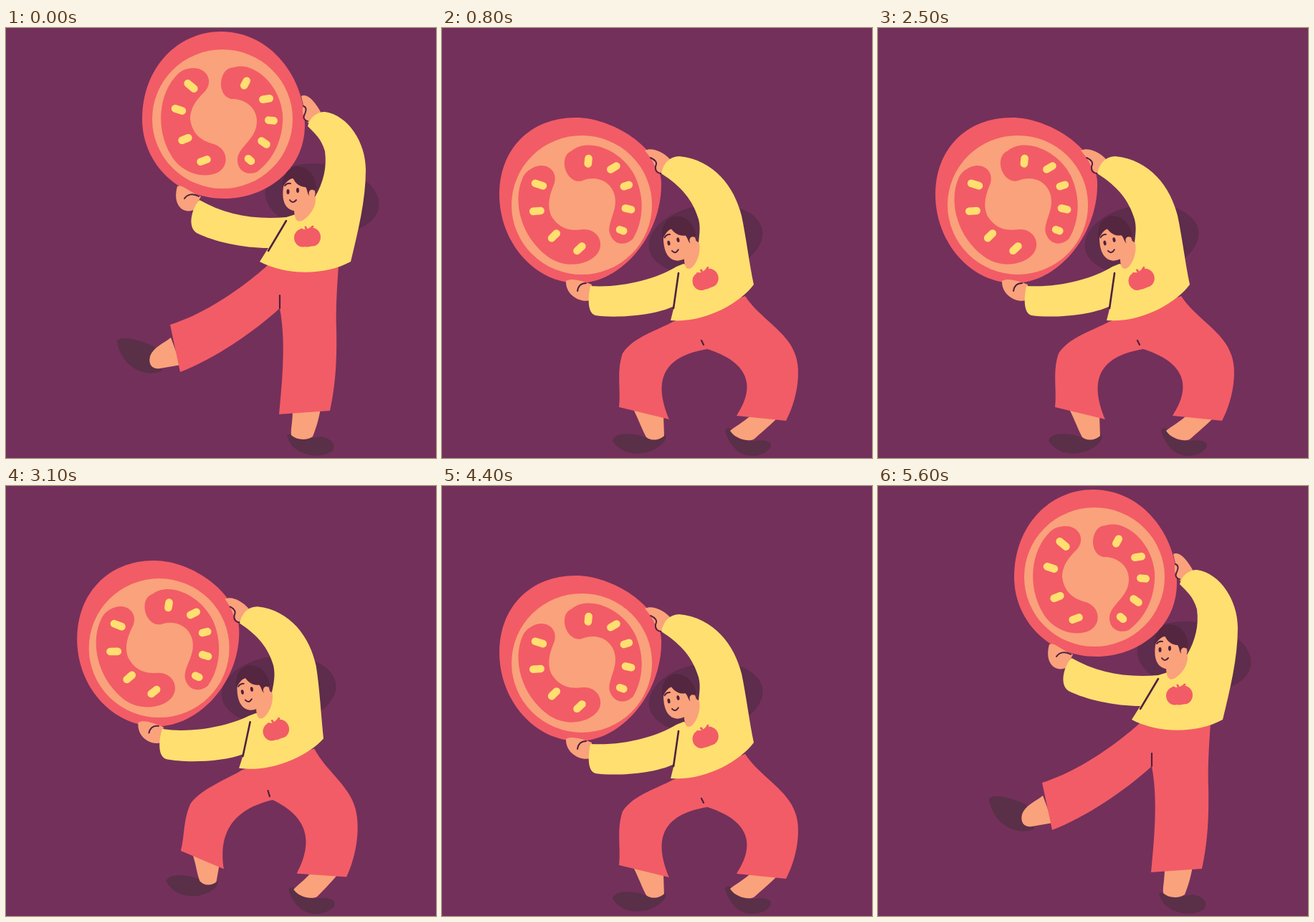
These frames come from a looping animation (600 by 600 pixels, 5.7 s). An HTML page with a canvas:

```html
<!DOCTYPE html>
<html lang="en">
<head>
<meta charset="utf-8">
<title>Tomato dance</title>
<style>
html, body { margin: 0; width: 100%; height: 100%; overflow: hidden; background: #73305b; }
canvas { display: block; width: 100vw; height: 100vh; }
</style>
</head>
<body>
<canvas id="stage" width="600" height="600"></canvas>
<script>
const ctx = document.getElementById('stage').getContext('2d');
const BG = '#73305b', RED = '#f25c66', PEACH = '#faa27b', YELLOW = '#ffdf70';
const HAIR = '#5e2c4c', FRINGE = '#54263f', SHOE = '#5a2f48', INK = '#4d2140';
const STEP = 100, LOOP = 5700, BEAT = 1900, LOW = 800, RISE = 850;

// Each body part has a path for standing tall and one for squatting.
const part = (tall, squat) => ({ tall, squat });

const pants = part(
  'M365 331 C345 350 310 375 285 389 C265 400 248 408 229 414 L243 480 C290 462 345 425 382 391 C389 430 388 470 381 539 L452 534 C459 500 462 470 461 420 C460 390 462 360 464 331 Z',
  'M322 410 C300 422 267 431 252 454 C243 480 250 505 247 529 L317 546 C300 505 296 460 370 448 C415 462 445 490 411 541 L480 548 C495 520 502 480 493 456 C483 424 442 404 423 374 Z');
const shirt = part(
  'M421 137 C424 124 434 117 445 117 C478 122 502 160 502 198 C502 240 491 285 481 326 C440 348 385 343 354 326 L366 307 C330 307 290 298 266 286 C252 277 260 250 270 240 C305 260 345 268 391 264 L404 260 C420 255 428 245 431 236 C443 215 448 195 445 172 C440 155 432 148 421 137 Z',
  'M306 203 C309 188 318 179 331 179 C380 184 408 222 418 262 C424 290 429 330 435 358 C415 385 365 412 319 408 L324 388 C295 402 240 405 214 401 C202 397 204 374 207 360 C250 363 300 350 327 333 L337 329 C350 335 357 318 358 300 C359 288 361 279 358 267 C350 240 334 221 306 203 Z');
const neck = part(
  'M402 252 C402 270 408 273 416 267 C426 260 433 248 432 236 L425 228 Z',
  'M338 318 C337 335 343 340 350 333 C357 325 361 312 359 300 L350 294 Z');
const armLine = part('M391 269 L366 311', 'M330 342 L323 391');
const crotch = part('M382 373 L382 391', 'M362 436 Q365 442 371 447');

const kickShoe = part(
  'M155 437 C160 428 190 436 207 445 L218 478 C200 488 162 478 155 437 Z',
  'M238 576 C240 564 265 564 284 571 L312 567 C318 585 262 612 238 576 Z');
const kickFoot = part(
  'M230 432 C220 440 205 446 201 458 C198 470 205 477 215 475 L244 470 Z',
  'M267 532 C275 548 279 560 285 571 C293 577 304 575 310 569 L309 541 Z');
const baseShoe = part(
  'M392 569 C395 566 400 566 402 570 C415 575 430 572 440 570 C455 574 460 580 456 589 C445 602 400 600 392 569 Z',
  'M395 562 C398 556 403 558 405 563 C415 575 425 577 435 576 C450 574 462 576 458 586 C445 602 408 606 395 562 Z');
const baseFoot = part(
  'M400 533 C400 550 397 560 398 568 C405 575 420 576 428 570 C432 560 436 548 439 531 Z',
  'M432 540 C420 550 408 557 402 562 C408 572 425 578 435 574 C445 565 455 557 468 544 Z');

const topHand = part(
  'M412 95 C420 90 432 103 440 119 L424 133 C415 131 412 114 415 108 Z',
  'M283 171 C292 166 308 172 318 183 L308 203 C299 203 297 190 291 181 Z');
const topLine = part(
  'M415 109 C421 111 418 118 416 122 C414 126 418 130 421 130',
  'M291 181 C297 184 301 187 298 193 C297 200 301 203 306 203');
const lowHand = part(
  'M239 221 C246 217 254 228 272 235 L262 254 C246 260 232 246 239 221 Z',
  'M173 353 C182 348 198 354 209 358 L207 380 C192 384 172 372 173 353 Z');
const lowLine = part('M249 238 C253 232 261 230 269 235', 'M189 367 C190 360 194 356 201 356');

const rind = part(
  'M300 5 C370 5 417 70 417 135 C417 200 360 238 305 238 C235 238 190 185 190 127 C190 55 240 5 300 5 Z',
  'M187 125 C235 125 306 165 306 218 C306 290 250 356 190 356 C130 356 80 300 80 232 C80 170 122 125 187 125 Z');
const pulp = new Path2D(
  'M262 56 C280 56 290 74 278 88 C268 98 257 110 257 127 C260 150 275 158 290 162 C309 168 312 190 298 200 C280 212 245 204 230 177 C208 140 213 90 240 64 C246 58 254 56 262 56 Z ' +
  'M318 55 C345 46 382 78 386 120 C388 155 372 185 350 201 C335 207 322 198 323 182 C325 165 350 155 350 130 C350 112 335 100 318 99 C305 100 297 85 301 70 C304 60 310 55 318 55 Z');
// x, y, tilt in degrees, half length
const seeds = [
  [258, 81, 40, 11], [241, 114, 18, 10.5], [250, 155, -22, 10], [276, 185, -20, 10],
  [334, 77, -62, 9], [363, 99, -8, 10], [370, 129, 5, 9], [360, 160, 35, 9.5], [340, 184, 42, 8]
];
const face = new Path2D('M389 212 C384 232 385 251 401 255 C419 257 431 242 431 224 L422 206 Z');
const fringe = new Path2D('M386 222 C391 214 396 211 400 209 C404 217 410 222 418 222 C421 226 420 231 423 234 L433 224 C432 204 420 193 406 193 C392 195 386 208 386 222 Z');

const mix = (a, b, k) => a + (b - a) * k;
const ease = (u, a, b) => 1 - Math.pow(1 - Math.pow(Math.min(u, 1), a), b);

// 0 = standing tall, 1 = squatting
function squatAt(t) {
  const b = t % BEAT;
  return b < LOW ? ease(b / LOW, 2, 9) : 1 - ease((b - LOW) / RISE, 5.5, 12);
}

function blend(p, k) {
  const to = p.squat.match(/[\d.]+/g);
  let i = 0;
  return new Path2D(p.tall.replace(/[\d.]+/g, n => mix(+n, +to[i++], k).toFixed(2)));
}

function fill(path, color) {
  ctx.fillStyle = color;
  ctx.fill(path);
}

function line(path, width, color = INK) {
  ctx.strokeStyle = color;
  ctx.lineWidth = width;
  ctx.stroke(path);
}

function oval(x, y, rx, ry, color, deg = 0) {
  ctx.beginPath();
  ctx.ellipse(x, y, rx, ry, deg * Math.PI / 180, 0, Math.PI * 2);
  ctx.fillStyle = color;
  ctx.fill();
}

// Moves a rigid piece from (x, y) to its squat position while tilting it.
function rigid(x, y, dx, dy, deg, k, paint) {
  ctx.save();
  ctx.translate(x + dx * k, y + dy * k);
  ctx.rotate(deg * k * Math.PI / 180);
  ctx.translate(-x, -y);
  paint();
  ctx.restore();
}

function core() {
  fill(pulp, RED);
  for (const [x, y, deg, r] of seeds) {
    ctx.save();
    ctx.translate(x, y);
    ctx.rotate(deg * Math.PI / 180);
    ctx.beginPath();
    ctx.roundRect(-r, -5.3, r * 2, 10.6, 5.3);
    ctx.fillStyle = YELLOW;
    ctx.fill();
    ctx.restore();
  }
}

function head() {
  fill(face, PEACH);
  fill(fringe, FRINGE);
  oval(427, 231, 4.5, 5.5, PEACH);
  oval(393.5, 228.5, 2, 3.4, INK);
  oval(407, 226.5, 2, 3.4, INK);
  line(new Path2D('M389 220 Q392 216 397 217'), 2);
  line(new Path2D('M396 240 Q400 246 405 240'), 2);
}

function badge() {
  oval(413.5, 293, 11.5, 12.5, RED, -8);
  oval(427, 291.5, 12, 13, RED, -8);
  oval(420, 296, 13, 9.5, RED);
  line(new Path2D('M412 281 Q417 284 421 282 Q424 281 428 277 M420 283 L418 278'), 3, RED);
}

function draw(k) {
  ctx.fillStyle = BG;
  ctx.fillRect(0, 0, 600, 600);
  ctx.lineCap = ctx.lineJoin = 'round';

  oval(mix(441, 368, k), mix(238, 295, k), 80, 48, HAIR, mix(9, -9, k));
  fill(blend(rind, k), RED);
  oval(mix(302, 195, k), mix(127, 247, k), 98, 97, PEACH);
  rigid(303.5, 121.5, -110.5, 117, -22.5, k, core);

  fill(blend(kickShoe, k), SHOE);
  fill(blend(kickFoot, k), PEACH);
  fill(blend(baseShoe, k), SHOE);
  fill(blend(baseFoot, k), PEACH);
  fill(blend(pants, k), RED);
  line(blend(crotch, k), 2.2);

  fill(blend(topHand, k), PEACH);
  line(blend(topLine, k), 2);
  fill(blend(lowHand, k), PEACH);
  line(blend(lowLine, k), 2);

  fill(blend(shirt, k), YELLOW);
  fill(blend(neck, k), PEACH);
  line(blend(armLine, k), 2.6);
  rigid(420, 292, -53, 59, -15, k, badge);
  rigid(408, 230, -77, 69, -10, k, head);
}

const start = performance.now();
function tick() {
  const t = (performance.now() - start) % LOOP;
  draw(squatAt(Math.floor(t / STEP) * STEP));
  requestAnimationFrame(tick);
}
tick();
</script>
</body>
</html>
```
